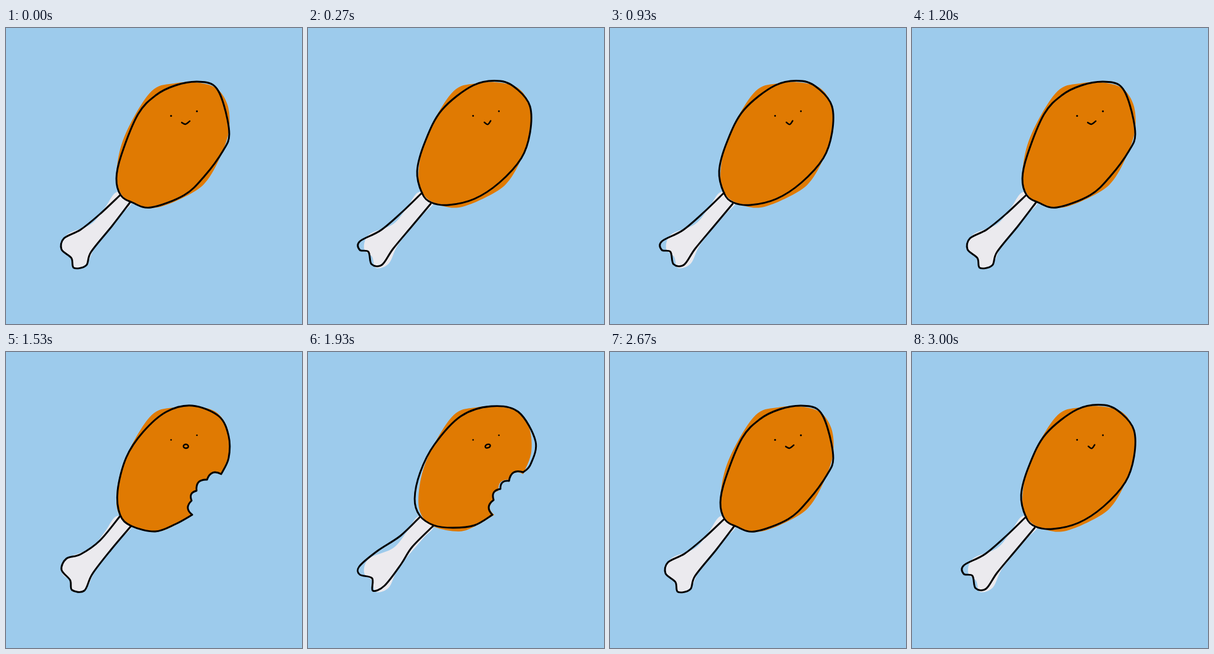
Animation of 480 by 480 pixels, one loop 3070 ms. Source, as an HTML page with a canvas:

```html
<!DOCTYPE html>
<html lang="en">
<head>
<meta charset="utf-8">
<title>Drumstick</title>
<style>
  html, body { margin: 0; width: 100%; height: 100%; overflow: hidden; background: #9dcbec; }
  canvas { display: block; width: 480px; height: 480px; }
</style>
</head>
<body>
<canvas id="stage" width="480" height="480"></canvas>
<script>
const ctx = document.getElementById('stage').getContext('2d');
const LOOP = 3070, FPS = 15, TICKS = 46, POSES = 12;
const SKY = '#9dcbec', MEAT = '#e07a02', BONE = '#ebeaee', INK = '#000';

// Key points are flat x,y lists joined by smooth curves.
// A bite is a list of cusps joined by scallops that cut into the meat.
const meat = [245,291, 206,284, 186,268, 179,240, 187,190, 211,138, 240,99, 272,90,
  305,88, 340,97, 359,124, 362,163];
const wholeFill = { body: [...meat, 350,203, 327,246, 299,269] };
const bittenFill = {
  body: [302,264, 272,282, ...meat, 349,198],
  bite: [349,198, 326,207, 309,225, 301,241, 302,264]
};
const boneFill = [180,266, 160,292, 138,318, 99,335, 91,358, 104,371, 110,389, 131,382,
  147,350, 186,303, 203,283];

const smileA = {
  body: [186,271, 179,244, 187,206, 214,140, 243,109, 275,93, 310,87, 338,94, 353,124,
    362,172, 352,199, 322,240, 289,271, 235,291, 205,283],
  bone: [185,271, 152,302, 121,327, 94,341, 90,359, 106,373, 110,389, 130,385, 138,363,
    172,321, 201,283],
  eye: 1.6,
  mouth: [285,153.3, 291,156, 298,151]
};
const smileB = {
  body: [185,268, 177,232, 190,184, 217,133, 268,93, 312,86, 340,100, 360,127, 360,170,
    346,211, 310,251, 270,277, 228,287, 200,283],
  bone: [185,267, 153,298, 118,328, 84,346, 84,360, 98,363, 103,383, 120,384, 138,358,
    168,322, 199,285],
  eye: 1.4,
  mouth: [286,153, 291.5,156.4, 296.2,150.5]
};
const bittenA = {
  body: [302,264, 275,279, 242,291, 203,282, 185,264, 181,225, 195,171, 222,130, 260,97,
    302,87, 345,104, 361,136, 361,172, 349,198],
  bite: bittenFill.bite,
  bone: [185,266, 152,306, 121,328, 98,335, 90,353, 104,370, 107,386, 127,387, 140,360,
    170,321, 203,282],
  eye: 1.3,
  oval: [291.7, 152.9, 4, 3.1, 0.1]
};
const bittenB = {
  body: [299,264, 270,281, 235,285, 204,281, 181,265, 173,238, 182,195, 205,150, 248,104,
    297,88, 341,97, 369,145, 361,182, 349,195],
  bite: [349,195, 326,209, 312,222, 301,240, 299,264],
  bone: [182,267, 150,298, 112,323, 83,348, 84,361, 104,367, 105,387, 124,379, 151,344,
    169,316, 203,282],
  eye: 1.3,
  oval: [291.5, 152.6, 4.2, 2.8, -0.35]
};

function trace(p, closed) {
  const n = p.length / 2;
  const at = i => {
    const k = closed ? (i + n) % n : Math.max(0, Math.min(n - 1, i));
    return [p[2 * k], p[2 * k + 1]];
  };
  ctx.beginPath();
  ctx.moveTo(p[0], p[1]);
  for (let i = 0; i < (closed ? n : n - 1); i++) {
    const [a, b, c, d] = [at(i - 1), at(i), at(i + 1), at(i + 2)];
    ctx.bezierCurveTo(
      b[0] + (c[0] - a[0]) / 6, b[1] + (c[1] - a[1]) / 6,
      c[0] - (d[0] - b[0]) / 6, c[1] - (d[1] - b[1]) / 6, c[0], c[1]);
  }
}

function scallops(p, depth = 0.58) {
  for (let i = 2; i < p.length; i += 2) {
    const [x0, y0, x1, y1] = p.slice(i - 2, i + 2);
    ctx.quadraticCurveTo(
      (x0 + x1) / 2 - (y1 - y0) * depth,
      (y0 + y1) / 2 + (x1 - x0) * depth, x1, y1);
  }
}

function traceBody({ body, bite }) {
  trace(body, !bite);
  if (bite) scallops(bite);
  ctx.closePath();
}

function fill(color) {
  ctx.fillStyle = color;
  ctx.fill();
}

function stroke(width) {
  ctx.lineWidth = width;
  ctx.stroke();
}

function face({ eye, mouth, oval }) {
  for (const [x, y] of [[267.7, 142.5], [309.6, 135]]) {
    ctx.beginPath();
    ctx.arc(x, y, eye, 0, Math.PI * 2);
    fill(INK);
  }
  if (mouth) {
    trace(mouth, false);
  } else {
    ctx.beginPath();
    ctx.ellipse(...oval, 0, Math.PI * 2);
  }
  stroke(2.4);
}

function draw(time) {
  const tick = Math.floor((time % LOOP + 4) * FPS / 1000);
  const pose = Math.min(POSES - 1, Math.floor((tick + 0.5) * POSES / TICKS));
  const bitten = pose >= 6 && pose < 10;
  const art = (bitten ? [bittenA, bittenB] : [smileA, smileB])[pose % 2];

  ctx.fillStyle = SKY;
  ctx.fillRect(0, 0, 480, 480);
  trace(boneFill, true);
  fill(BONE);
  traceBody(bitten ? bittenFill : wholeFill);
  fill(MEAT);

  ctx.strokeStyle = INK;
  ctx.lineCap = ctx.lineJoin = 'round';
  trace(art.bone, false);
  stroke(2.9);
  traceBody(art);
  stroke(2.9);
  face(art);
}

const start = performance.now();
function loop() {
  draw(performance.now() - start);
  requestAnimationFrame(loop);
}
loop();
</script>
</body>
</html>
```
